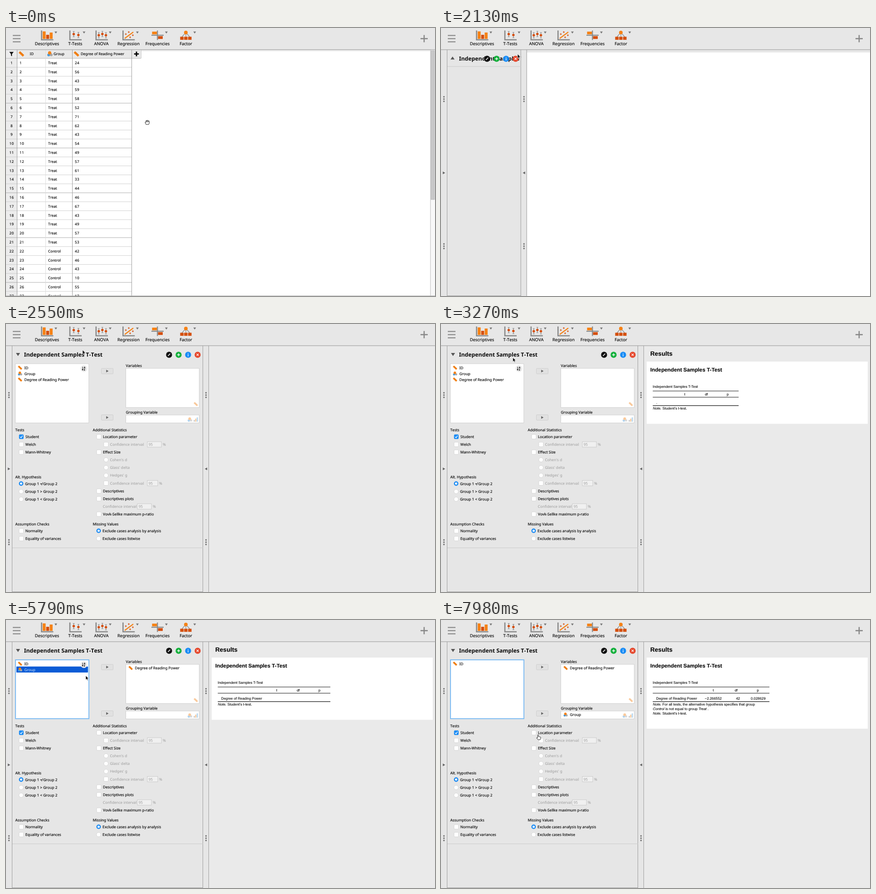
Animation, 947 px wide and 592 px high, one loop 8000 ms. Source, as an HTML page:

```html
<!DOCTYPE html>
<html lang="en">
<head>
<meta charset="utf-8">
<title>Independent samples t-test</title>
<style>
html, body { margin: 0; width: 100%; height: 100%; overflow: hidden; background: #e7e7e7; }
svg { display: block; }
text {
  font: 8.2px "Noto Sans", "DejaVu Sans", sans-serif; font-kerning: none; white-space: pre;
  fill: #0a0a0a; stroke: #0a0a0a; stroke-width: .16px; text-rendering: geometricPrecision;
}
.bar text { font-size: 9.4px; text-anchor: middle; }
.grid text { font-size: 8px; }
.grid .num { letter-spacing: .4px; }
.grid .mid, .mid { text-anchor: middle; }
.title { font-size: 12.25px; font-weight: 700; stroke: none; }
text.off { fill: #9b9b9b; stroke: none; }
.lit text { fill: #d5e6ff; stroke: none; }
.res text { font: 7.85px "Liberation Sans", Arial, sans-serif; font-kerning: normal; fill: #000; stroke-width: .08px; }
.res .h1 { font-size: 13.57px; font-weight: 700; }
.res .h2 { font-size: 11.75px; font-weight: 700; }
.res tspan { font-style: italic; }
.sort text { font-size: 5px; font-weight: 700; }
.box { fill: #fff; stroke: #c9c9c9; stroke-width: .8; }
</style>
</head>
<body>
<svg id="stage" width="947" height="592" viewBox="0 0 947 592"></svg>
<script>
const LOOP = 8000;
const ORANGE = '#f58216', RUST = '#d5500f', GRAY = '#888', BLUE = '#1a8cf5';
const scores = [24, 56, 43, 59, 58, 52, 71, 62, 43, 54, 49, 57, 61, 33, 44, 46, 67, 43, 49, 57, 53,
  42, 46, 43, 10, 55, 17];

// Drawing helpers
const text = (x, y, s, cls = '') => `<text x="${x}" y="${y}" class="${cls}">${s}</text>`;
const rect = (x, y, w, h, fill, more = '') =>
  `<rect x="${x}" y="${y}" width="${w}" height="${h}" fill="${fill}" ${more}/>`;
const line = (x1, y1, x2, y2, c, w = 1) =>
  `<path d="M${x1} ${y1}L${x2} ${y2}" stroke="${c}" stroke-width="${w}"/>`;
const dot = (x, y, r, fill, more = '') => `<circle cx="${x}" cy="${y}" r="${r}" fill="${fill}" ${more}/>`;
const path = (d, fill, more = '') => `<path d="${d}" fill="${fill}" ${more}/>`;
const at = (x, y, s, k = 1) => `<g transform="translate(${x} ${y}) scale(${k})">${s}</g>`;
const during = (spans, s, id = '') => `<g data-on="${spans}" id="${id}">${s}</g>`;

const ruler = `<g transform="rotate(43)">${rect(-6.3, -2.4, 12.6, 4.8, ORANGE, 'rx=".5"')}` +
  [-4, -2, 0, 2, 4].map(x => line(x, -2.4, x, -.4, '#b85a08', .6)).join('') + '</g>';
const nominal = dot(2.9, 2.2, 3.1, '#a9a9a9') + dot(-2.8, 2.5, 3.1, '#4a9ad8') + dot(-.6, -2.1, 3.6, ORANGE);
const ordinal = rect(-5, 1, 2.8, 4, GRAY) + rect(-1.5, -2, 2.8, 7, ORANGE) + rect(2, -5, 2.8, 10, '#4a9ad8');

// Toolbar
const axis = x => path(`M${x} 5.5V26H${x + 26}`, 'none', `stroke="${GRAY}" stroke-width="2.6"`);
const whisker = (x, y) => line(x, y - 6, x, y + 6, GRAY, 1.2) + line(x - 2, y - 6, x + 2, y - 6, GRAY) +
  line(x - 2, y + 6, x + 2, y + 6, GRAY) + dot(x, y, 2.7, RUST);
const plus = (x, y, r, c, w) => line(x - r, y, x + r, y, c, w) + line(x, y - r, x, y + r, c, w);
const drop = x => path(`M${x - 3} 7.8h6l-3 4.4z`, '#777');

function toolbar() {
  const names = [['Descriptives', 90.5], ['T-Tests', 153], ['ANOVA', 210.5], ['Regression', 270.5],
    ['Frequencies', 334.5], ['Factor', 397]];
  const burger = [16.5, 23.5, 30.5].map(y => line(15, y, 32, y, GRAY, 2.2)).join('');
  const factor = path('M397 10V19M397 10L388 20M397 10L406 20', 'none', `stroke="${GRAY}" stroke-width="1.2"`) +
    dot(397, 10, 4, ORANGE) + [384.5, 393.2, 402].map(x => rect(x, 19.3, 7.6, 6.8, RUST)).join('');
  return `<g class="bar">${rect(0, 0, 947, 47.2, '#e7e7e7')}` +
    during('1140-1710', rect(124.5, -1, 57, 49, '#cfcfcf', 'stroke="#a8a8a8"')) +
    line(0, 47.8, 947, 47.8, '#a4a4a4', 1.2) + burger + plus(923, 23.5, 8, GRAY, 2.6) +
    axis(78.5) + rect(81, 7.5, 6.5, 16.5, ORANGE) + rect(88.7, 15, 6.5, 9, RUST) + rect(96.4, 10, 6.5, 14, ORANGE) +
    axis(141) + whisker(149.5, 13.5) + whisker(159.8, 15.5) +
    axis(198.8) + whisker(204.8, 16) + whisker(212.7, 13.2) + whisker(220.6, 16) +
    axis(258.3) + line(262, 23, 281, 9, ORANGE, 2.2) +
    plus(264.5, 13.5, 2, RUST, 1.2) + plus(271, 9, 2, RUST, 1.2) +
    plus(274, 20.5, 2, RUST, 1.2) + plus(280, 16, 2, RUST, 1.2) +
    rect(322.5, 8, 10.5, 6, ORANGE) + rect(335.5, 18, 10.5, 6.2, RUST) +
    line(321, 16, 348, 16, GRAY, 2.2) + line(334.3, 5.5, 334.3, 26.5, GRAY, 2.2) + factor +
    [110, 172.3, 230, 290, 354, 416.5].map(drop).join('') +
    names.map(([s, x]) => text(x, 38.3, s)).join('') + '</g>';
}

// Spreadsheet
function sheet() {
  const top = 67, step = 19.8;
  let s = rect(0, 48, 947, 544, '#fff') + rect(0, 48, 298, 19, '#e9e9e9') + rect(0, 48, 24, 544, '#ececec');
  scores.forEach((n, i) => {
    const y = top + step * i, base = y + 12.9;
    s += line(0, y + step, 277, y + step, i % 5 === 4 ? '#999' : '#c4c4c4', .8) +
      text(12.5, base, i + 1, 'num mid') + text(30, base, i + 1, 'num') +
      text(93, base, i < 21 ? 'Treat' : 'Control') + text(152, base, n, 'num');
  });
  s += line(0, 67, 298, 67, '#b5b5b5') + line(87.5, 48, 87.5, 592, '#dcdcdc');
  s += [24.5, 146.5, 277.5].map(x => line(x, 48, x, 592, '#9c9c9c')).join('') + line(298.5, 48, 298.5, 67, '#ccc');
  s += path('M7.2 52.8h9.8l-3.8 4.6v5l-2.2-1.5v-3.5z', '#111') + at(34, 57.3, ruler) + at(97, 57, nominal) +
    at(155.5, 57.3, ruler) + text(52.5, 60, 'ID') + text(105, 60, 'Group') +
    text(165, 60, 'Degree of Reading Power') + plus(288, 57.3, 5.2, '#000', 2.8);
  s += rect(937, 48, 10, 544, '#f8f8f8') + line(937, 48, 937, 592, '#b8b8b8') +
    rect(938, 50, 8, 329, '#c8c8c8', 'stroke="#b0b0b0" stroke-width=".7"') +
    line(0, 591.5, 947, 591.5, '#b4b4b4') + rect(299, 48, 637, 5, 'url(#fade)');
  return `<g class="grid">${s}</g>`;
}

function menu() {
  const kinds = ['Independent Samples T-Test', 'Paired Samples T-Test', 'One Sample T-Test'];
  return rect(124.5, 48, 160, 98, '#f1f1f1', 'stroke="#bdbdbd" stroke-width=".8" filter="url(#shade)"') +
    kinds.map((k, i) => text(131.5, 60.3 + 13.9 * i, k) + text(131.5, 111.1 + 13.9 * i, 'Bayesian ' + k)).join('') +
    line(127, 97.5, 282, 97.5, '#c6c6c6');
}

// Analysis form
const item = (x, y, s, icon) => at(x, y, icon, .78) + text(x + 9.5, y + 3, s);
const DEG = 'Degree of Reading Power';
const check = (y, x, s, off = '') => rect(x - 5, y - 5, 10, 10, '#fff', 'rx="2" stroke="#cfcfcf" stroke-width=".8"') +
  text(x + 9, y + 3, s, off);
const radio = (y, x, s, off = '') => dot(x, y, 4.8, '#fff', 'stroke="#cfcfcf" stroke-width=".8"') +
  text(x + 8.6, y + 3, s, off);
const picked = (y, x, s) => radio(y, x, s) + dot(x, y, 3.7, '#fff', `stroke="${BLUE}" stroke-width="2.4"`);
const field = (x, y, w) => rect(x, y - 6, w, 12, '#f0f0f0', 'stroke="#c4c4c4" stroke-width=".8"') +
  text(x + 2.7, y + 3, '95', 'off') + text(x + w + 3, y + 3, '%', 'off');

function options() {
  return text(20.5, 237, 'Tests') + check(249, 33.8, 'Student') +
    rect(28.8, 244, 10, 10, BLUE, 'rx="2"') + path('M31.3 249.2l2 2.2 3.2-4.8', 'none', 'stroke="#fff" stroke-width="1.3"') +
    check(266, 33.8, 'Welch') + check(283, 33.8, 'Mann-Whitney') +
    text(20.5, 341, 'Alt. Hypothesis') + picked(352.5, 33.4, 'Group 1 ≠ Group 2') +
    radio(370, 33.4, 'Group 1 &gt; Group 2') + radio(387, 33.4, 'Group 1 &lt; Group 2') +
    text(20.5, 444.5, 'Assumption Checks') + check(457, 33.8, 'Normality') + check(474, 33.8, 'Equality of variances') +
    text(191.5, 237, 'Additional Statistics') + check(249, 205, 'Location parameter') +
    check(266, 220.8, 'Confidence interval', 'off') + field(312, 266, 31) + check(283, 205, 'Effect Size') +
    ["Cohen's d", "Glass' delta", "Hedges' g"].map((s, i) => radio(300 + 17.2 * i, 220.8, s, 'off')).join('') +
    check(351.5, 220.8, 'Confidence interval', 'off') + field(312, 351.5, 23) +
    check(369, 205, 'Descriptives') + check(386, 205, 'Descriptives plots') +
    text(213.8, 406, 'Confidence interval', 'off') + field(290, 403, 31) +
    check(420, 205, 'Vovk-Sellke maximum p-ratio') + text(191.5, 444.5, 'Missing Values') +
    picked(456.7, 204.5, 'Exclude cases analysis by analysis') + radio(474, 204.5, 'Exclude cases listwise');
}

function form() {
  const move = y => rect(-13, y - 6, 26, 12, '#e1e1e1', 'rx="1.5" stroke="#cacaca" stroke-width=".8"') +
    path(`M-2.3 ${y - 3}l5.2 3-5.2 3z`, '#666');
  const sort = during('0-6510', dot(-11, 98.5, 7.6, '#ececec') + line(-13.8, 94.5, -13.8, 102, '#111', 1) +
    path('M-15.6 100h3.6l-1.8 3z', '#111') + text(-11.2, 98, 'A') + text(-11.2, 102.7, 'Z'));
  const tools = dot(-75, 68, 6.7, '#111') + line(-77.5, 70.5, -72.5, 65.5, '#fff', 1.6) +
    dot(-54, 68, 6.7, '#14b03c') + plus(-54, 68, 3.2, '#fff', 1.4) +
    dot(-33, 68, 6.7, BLUE) + dot(-33, 65, .8, '#fff') + line(-33, 66.8, -33, 71.5, '#fff', 1.3) +
    dot(-12, 68, 6.7, '#e5482d') + path('M-14.4 65.6l4.8 4.8m0-4.8l-4.8 4.8', 'none', 'stroke="#fff" stroke-width="1.3"');
  const lit = (y, s, icon) => `<g class="lit">${rect(23, y - 6.8, 0, 13.2, '#0a5cd6', 'data-pad="4" rx="1"')}${item(31, y, s, icon)}</g>`;
  const col = (x, y, h) => `<rect x="${x}" y="${y}" height="${h}" class="box" data-pad="0"/>`;
  return during('0-2460', path('M21 69.5h9l-4.5-6.5z', '#555')) + during('2460-8000', path('M22 64h9l-4.5 6.8z', '#555')) +
    text(39.8, 72.3, 'Independent Samples T-Test', 'title') + `<g id="tools">${tools}</g>` +
    col(20.8, 87.8, 130.7) +
    during('3600-8000', `<rect x="21" y="88" height="130" fill="none" stroke="#7fbcf2" stroke-width="2" data-pad="0"/>`) +
    item(31, 96.5, 'ID', ruler) + during('0-6510', item(31, 109.5, 'Group', nominal)) +
    during('0-4500', item(31, 122.7, DEG, ruler)) +
    during('3600-4500', lit(122.7, DEG, ruler)) + during('5400-6510', lit(109.5, 'Group', nominal)) +
    `<g id="sort" class="sort">${sort}</g><g id="moves">${move(104)}${move(206.5)}</g>` +
    `<g id="vars">${text(0, 95.3, 'Variables')}${col(0, 98, 86.5)}${text(0, 198, 'Grouping Variable')}${col(0, 201, 17.5)}` +
    during('4500-8000', item(10.5, 106, DEG, ruler)) + during('6510-8000', item(10.5, 209, 'Group', nominal)) + '</g>' +
    `<g id="ghost" opacity=".42">${at(-16, 177, ruler, .78)}${at(-29, 211, nominal, .85)}${at(-16, 211, ordinal, .95)}</g>` + options();
}

const grip = dir => [157, 482].map(y => [-5, 0, 5].map(d => dot(0, y + d, 1.8, '#777')).join('')).join('') +
  path(`M${-2.6 * dir} 317L${2.8 * dir} 320L${-2.6 * dir} 323z`, '#666');

// Results
function table(end, cols, row, notes) {
  return [148, 161.7, 180.3].map(y => line(467.5, y, end, y, '#111', y > 180 ? 1.3 : 1)).join('') +
    ['t', 'df', 'p'].map((s, i) => text(cols[i], 157.5, s, 'mid')).join('') + row +
    notes.map((s, i) => text(467.8, 189 + 9.8 * i, s)).join('');
}

function results() {
  const student = "<tspan>Note.</tspan> Student's t-test.";
  const name = text(475, 175.8, DEG);
  const full = name + text(601, 175.8, '−2.266552', 'mid') + text(655.5, 175.8, '42', 'mid') + text(700.2, 175.8, '0.028629', 'mid');
  return `<g class="res">${rect(454, 83, 488, 137.5, '#fff')}` + during('7290-8000', rect(454, 220, 488, 20, '#fff')) +
    text(462, 69.8, 'Results', 'h1') + text(462, 104.6, 'Independent Samples T-Test', 'h2') +
    text(467.3, 141, 'Independent Samples T-Test') +
    during('0-4830', table(657, [538, 585.7, 633], text(475, 175.8, '.'), [student])) +
    during('4830-7290', table(716, [597.5, 645, 692], name, [student])) +
    during('7290-8000', table(725, [601, 651.5, 699.5], full, [
      '<tspan>Note.</tspan> For all tests, the alternative hypothesis specifies that group',
      '<tspan>Control</tspan> is not equal to group <tspan>Treat</tspan> .', student])) + '</g>';
}

function cursor() {
  const skin = 'stroke="#111" stroke-width=".9" stroke-linejoin="round"';
  return during('0-930', path('M-3 5L-5 .6C-4.8-.6-3.8-.3-3.1.5V-3C-2.8-4.2-1.7-4-1.4-3-1.2-4.9.3-4.9.6-3 1-4.2 2.2-3.9 2.4-2.6 3.1-3.4 4.3-3 4.3-1.8V2L3 5z', '#fff', skin) +
      path('M-1.4-3V0M.6-3V0M2.4-2.6V0', 'none', skin)) +
    during('930-4020,4800-6090,7350-7800', path('M0 0V9.2L2.1 7.2 3.6 10.4 5.1 9.7 3.7 6.6H6.5z', '#000', 'stroke="#fff" stroke-width=".7"')) +
    during('4020-4800,6090-7350,7800-8000', path('M-1 6V.9C-.9-.3.8-.3 1 .9V4.2C1.8 3.6 2.5 3.8 2.8 4.5 3.5 4 4.2 4.3 4.4 5 5.1 4.7 5.7 5 5.7 5.8V8L4.6 11H0L-3.2 7.4C-3.6 6.3-2.3 5.6-1 7z', '#fff', skin));
}

const stage = document.getElementById('stage');
stage.innerHTML = `<defs>
  <linearGradient id="fade" x2="0" y2="1"><stop stop-color="#e2e2e2"/><stop offset="1" stop-color="#fff"/></linearGradient>
  <filter id="shade"><feDropShadow dx="0" dy="1" stdDeviation="1.3" flood-opacity=".3"/></filter>
  <clipPath id="panelClip"><rect id="clip" x="14" y="48"/></clipPath></defs>` +
  during('2040-2460', rect(0, 48, 947, 544, '#fff') + rect(0, 48, 947, 6, '#e7e7e7')) +
  during('2460-8000', rect(0, 48, 947, 544, '#eaeaea')) + during('2850-8000', results()) +
  during('2040-8000', `<rect id="panel" y="48" height="544" fill="#e6e6e6"/>` +
    line(13.5, 48, 13.5, 592, '#9c9c9c') + at(6.5, 0, grip(1)) +
    `<g id="split">${line(-.5, 48, -.5, 592, '#9c9c9c')}${line(12.5, 48, 12.5, 592, '#9c9c9c')}${at(6.5, 0, grip(-1))}</g>` +
    `<g clip-path="url(#panelClip)">${form()}</g><path id="fold" stroke="#cacaca"/>` +
    `<path id="base" stroke="#9c9c9c"/>`) +
  during('0-2040', sheet()) + toolbar() + during('1140-1710', menu(), 'menu') + `<g id="cursor">${cursor()}</g>`;

// Motion
const $ = id => document.getElementById(id);
const timed = [...stage.querySelectorAll('[data-on]')].map(el =>
  ({ el, spans: el.dataset.on.split(',').map(s => s.split('-').map(Number)) }));
const columns = [...stage.querySelectorAll('[data-pad]')];
const ramp = (t, a, b) => Math.min(1, Math.max(0, (t - a) / (b - a)));
const shift = (id, x, y = 0) => $(id).setAttribute('transform', `translate(${x} ${y})`);

const route = [[330, 312, 208], [1110, 163.8, 37], [1530, 163.8, 37], [1680, 169, 57.5], [3150, 169, 57.5],
  [3510, 130, 121], [3690, 130, 121], [4110, 212, 103.5], [4680, 212, 103.5], [5280, 165, 109],
  [5610, 165, 109], [5790, 176, 123], [6240, 218, 205], [7080, 218, 205], [7890, 214.3, 253.5], [8000, 214.3, 253.5]];

function pointer(t) {
  const i = route.findIndex(p => p[0] > t);
  if (i < 1) return route[0].slice(1);
  const [a, x, y] = route[i - 1], [b, u, v] = route[i];
  const k = ramp(t, a, b), e = k * k * (3 - 2 * k);
  return [x + (u - x) * e, y + (v - y) * e];
}

function layout(t) {
  const width = 421 * (1 - (1 - ramp(t, 2040, 2460)) ** 2);
  const edge = 14 + width, col = Math.max(0, .4 * (width - 16));
  const bottom = 85 + 409.5 * ramp(t, 2190, 2460);
  $('panel').setAttribute('width', edge + 13);
  $('clip').setAttribute('width', width);
  $('clip').setAttribute('height', bottom - 48);
  $('fold').setAttribute('d', `M14 ${bottom}H${edge}`);
  $('base').setAttribute('d', `M14 591.5H${edge}`);
  columns.forEach(c => c.setAttribute('width', Math.max(0, col - c.dataset.pad)));
  shift('split', edge);
  shift('tools', edge);
  shift('ghost', edge);
  shift('sort', 21 + col);
  shift('moves', 13 + width / 2);
  shift('vars', edge - 8.4 - col);
}

function render(t) {
  for (const { el, spans } of timed)
    el.style.display = spans.some(([a, b]) => t >= a && t < b) ? '' : 'none';
  $('menu').style.opacity = ramp(t, 1110, 1250);
  layout(t);
  shift('cursor', ...pointer(t));
}

const start = performance.now();
function tick() {
  render((performance.now() - start) % LOOP);
  requestAnimationFrame(tick);
}
tick();
</script>
</body>
</html>
```
